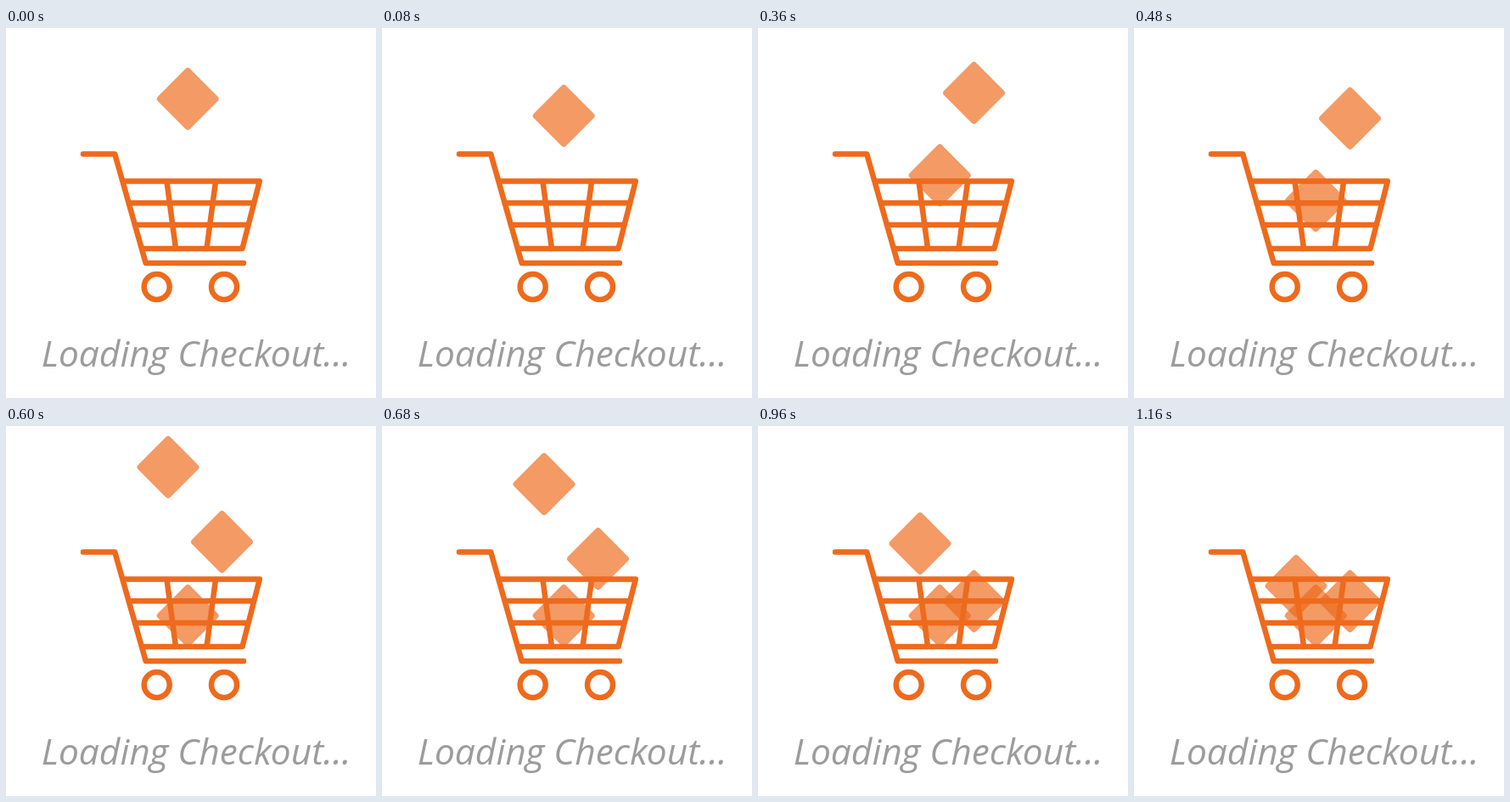
Write an HTML page that moves like this. It is 436 by 436 pixels and loops after 1200 ms.

```html
<!DOCTYPE html>
<html lang="en">
<head>
<meta charset="utf-8">
<title>Loading Checkout</title>
<style>
  html, body { margin: 0; height: 100%; overflow: hidden; background: #fff; }
  svg { display: block; width: 100vw; height: 100vh; }
  .cart { fill: none; stroke: #ee6a1c; stroke-width: 6.5; stroke-linecap: round; stroke-linejoin: round; }
  .item { fill: #ee6a1c; opacity: .68; }
  text { font: italic 42.6px "Open Sans", "Noto Sans", sans-serif; fill: #9c9c9c; }
</style>
</head>
<body>
<svg viewBox="0 0 436 436">
  <g id="items"></g>
  <g class="cart">
    <path d="M91 148.4H128.2L164.7 277H280"/>
    <path d="M138 180.6H298.8L278.5 260H160"/>
    <path d="M145 206.2H292M152 232H285M189.5 181L200 260M247 181L236.5 260"/>
    <circle cx="177.7" cy="305" r="15"/>
    <circle cx="257" cy="305" r="15"/>
  </g>
  <text x="41.7" y="399">Loading Checkout...</text>
</svg>
<script>
  const LOOP = 1200, STEP = 40, FALL = 560, SPEED = 0.25;
  const drops = [
    { x: 214.2, y: 83.5, start: 0 },
    { x: 254.5, y: 66.5, start: 320 },
    { x: 191, y: 48.5, start: 600 }
  ];
  const group = document.getElementById("items");

  for (const d of drops) {
    d.node = document.createElementNS("http://www.w3.org/2000/svg", "rect");
    const attrs = { class: "item", x: -26.9, y: -26.9, width: 53.8, height: 53.8, rx: 4 };
    for (const key in attrs) d.node.setAttribute(key, attrs[key]);
    group.append(d.node);
  }

  function draw(now) {
    // The motion advances in whole steps of 40 ms.
    const t = Math.floor((now % LOOP) / STEP) * STEP;
    for (const { node, x, y, start } of drops) {
      const age = t - start;
      const top = y + SPEED * Math.max(0, Math.min(age, FALL));
      node.setAttribute("visibility", age < 0 ? "hidden" : "visible");
      node.setAttribute("transform", `translate(${x} ${top}) rotate(45)`);
    }
  }

  let origin;
  function tick(now) {
    origin ??= now;
    draw(now - origin);
    requestAnimationFrame(tick);
  }
  draw(0);
  requestAnimationFrame(tick);
</script>
</body>
</html>
```
